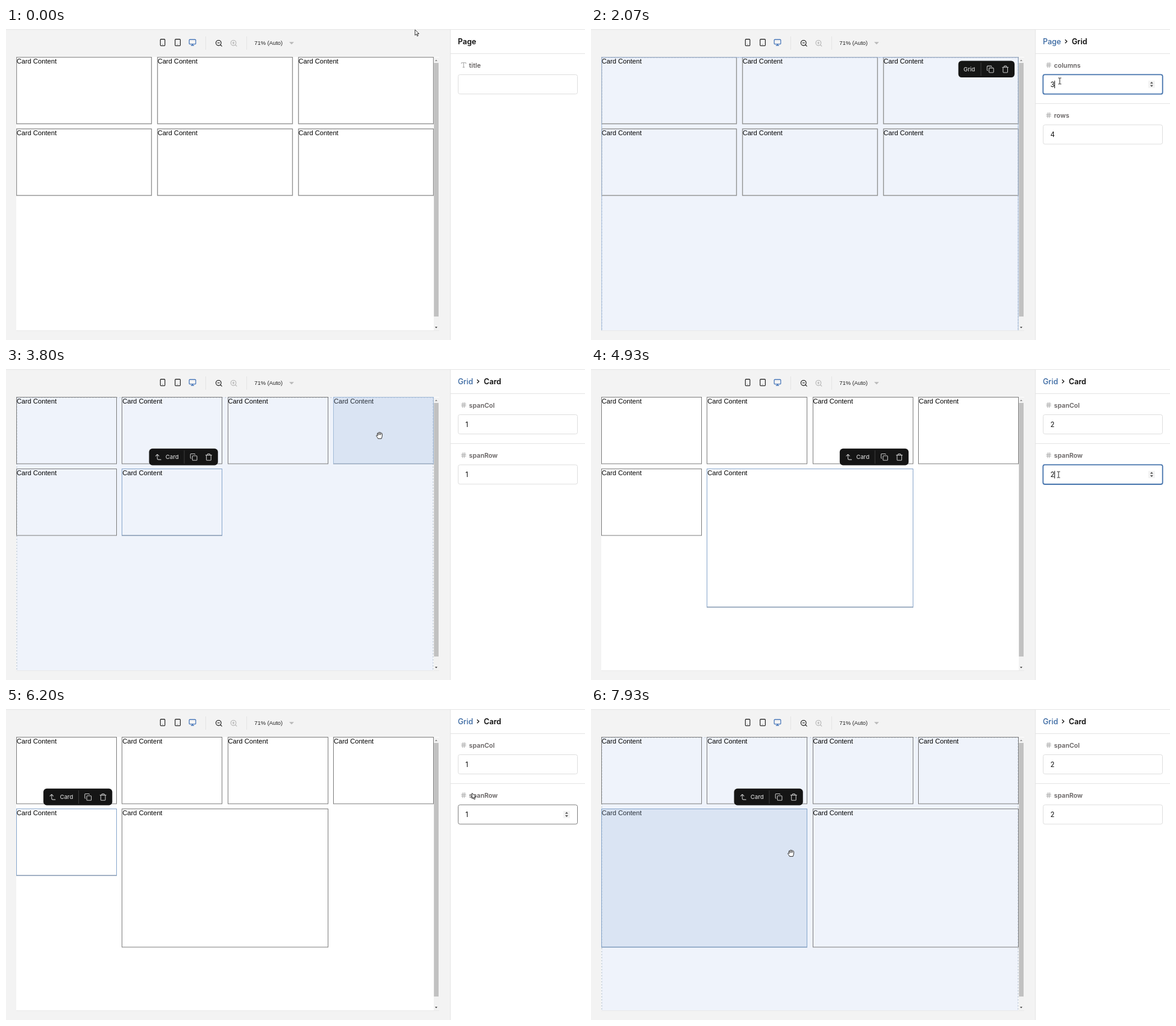
An HTML page for the animation above (8000 ms loop, 961 px wide and 518 px high).

```html
<!DOCTYPE html>
<html lang="en">
<head>
<meta charset="utf-8">
<title>Grid editor</title>
<style>
  html, body { margin: 0; width: 100%; height: 100%; overflow: hidden; background: #fff; }
  svg { display: block; }
  text { white-space: pre; font-family: Inter, sans-serif; }
  .arial { font-family: "Liberation Sans", Arial, sans-serif; }
  .icon { fill: none; stroke-width: 2; stroke-linecap: round; stroke-linejoin: round; }
  .line { stroke: #e4e4e4; }
  .title { font-size: 12.5px; }
  .bold { font-weight: 600; fill: #0a0a0a; }
  .label { font-size: 10.7px; font-weight: 600; fill: #646060; }
  .value { font-size: 11.2px; fill: #111; }
</style>
</head>
<body>
<svg id="stage" width="961" height="518" viewBox="0 0 961 518">
  <defs>
    <symbol id="phone" viewBox="0 0 24 24"><rect x="5" y="2" width="14" height="20" rx="2"/><path d="M12 18h.01"/></symbol>
    <symbol id="tablet" viewBox="0 0 24 24"><rect x="4" y="2" width="16" height="20" rx="2"/><path d="M12 18h.01"/></symbol>
    <symbol id="monitor" viewBox="0 0 24 24"><rect x="2" y="3" width="20" height="14" rx="2"/><path d="M8 21h8M12 17v4"/></symbol>
    <symbol id="zoomOut" viewBox="0 0 24 24"><circle cx="11" cy="11" r="8"/><path d="M21 21l-4.35-4.35M8 11h6"/></symbol>
    <symbol id="zoomIn" viewBox="0 0 24 24"><circle cx="11" cy="11" r="8"/><path d="M21 21l-4.35-4.35M8 11h6M11 8v6"/></symbol>
    <symbol id="copy" viewBox="0 0 24 24"><rect x="8" y="8" width="14" height="14" rx="2"/><path d="M4 16c-1.1 0-2-.9-2-2V4c0-1.1.9-2 2-2h10c1.1 0 2 .9 2 2"/></symbol>
    <symbol id="trash" viewBox="0 0 24 24"><path d="M3 6h18M19 6v14c0 1-1 2-2 2H7c-1 0-2-1-2-2V6M8 6V4c0-1 1-2 2-2h4c1 0 2 1 2 2v2"/></symbol>
    <symbol id="up" viewBox="0 0 24 24"><path d="M14 9L9 4 4 9M20 20h-7a4 4 0 0 1-4-4V4"/></symbol>
    <symbol id="hash" viewBox="0 0 24 24"><path d="M4 9h16M4 15h16M10 3L8 21M16 3l-2 18"/></symbol>
    <symbol id="type" viewBox="0 0 24 24"><path d="M4 7V4h16v3M9 20h6M12 4v16"/></symbol>
  </defs>

  <rect y="2" width="738" height="516" fill="#f3f3f3"/>
  <path class="line" d="M0 2.5H961M737.5 3V518M738 42.5H961"/>

  <g class="icon" stroke="#111">
    <use href="#phone" x="253.5" y="17.5" width="13" height="13"/>
    <use href="#tablet" x="278.5" y="17.5" width="13" height="13"/>
    <use href="#monitor" x="303" y="17.5" width="13" height="13" stroke="#2c63b0"/>
    <use href="#zoomOut" x="346.8" y="18.8" width="13" height="13"/>
    <use href="#zoomIn" x="371.5" y="18.8" width="13" height="13" stroke="#b4b4b4"/>
  </g>
  <path class="line" d="M331.5 14V36M399.5 14V36"/>
  <text class="arial" x="412.3" y="28.3" font-size="9.4" fill="#222">71% (Auto)</text>
  <path d="M470 23.3h8l-4 4z" fill="#b9b9b9"/>

  <rect x="17" y="48" width="702" height="454" fill="#fff"/>
  <path d="M17 502.5H719" stroke="#e9e9e9"/>
  <rect x="710" y="49" width="9" height="453" fill="#f2f2f2"/>
  <rect x="710.3" y="58" width="7.7" height="421" fill="#c1c1c1"/>
  <path d="M712 55h4l-2-2.4z" fill="#8a8a8a"/>
  <path d="M712 496h4l-2 2.4z" fill="#444"/>

  <svg x="17" y="48" width="693" height="454" viewBox="17 48 693 454">
    <g id="tint">
      <rect x="18" y="49" width="691" height="454" fill="#eff3fb"/>
      <rect id="edge" x="17.9" y="49" width="691" height="460" fill="none" stroke="#b9c4d2" stroke-dasharray="3 2"/>
    </g>
    <g id="cards"></g>
    <rect id="gridSel" x="17.7" y="48.8" width="691.4" height="470" fill="none" stroke="#a5bcdc"/>
    <rect id="hover" fill="rgb(155,183,219)" fill-opacity=".25" stroke="#a3bbd8"/>
    <rect id="cardSel" fill="none" stroke="#86a5cb"/>
  </svg>

  <g id="bar">
    <rect id="barBox" height="27.6" rx="5.5" fill="#151515"/>
    <g class="icon" stroke="#c4c4c4">
      <use id="upIcon" href="#up" x="-105.5" y="7.5" width="13" height="13"/>
      <use href="#copy" x="-46.7" y="7.6" width="13" height="13"/>
      <use href="#trash" x="-21.8" y="7.6" width="13" height="13"/>
    </g>
    <path d="M-55.8 3V25" stroke="#3d3d3d"/>
    <text id="barText" y="17.3" font-size="9.6" font-weight="500" fill="#cfcfcf"></text>
  </g>

  <text id="parent" class="title" x="750" y="26.5" font-weight="500" fill="#34649f"></text>
  <path id="chevron" d="M-1.6 -3l3 3-3 3" fill="none" stroke="#222" stroke-width="1.4"/>
  <text id="current" class="title bold" y="26.5"></text>
  <path id="divider" class="line" d="M738 125.5H961"/>
  <g id="fields"></g>

  <g id="cursor">
    <path id="arrow" d="M.4 .4V9.6L2.6 7.6 4.1 11 5.6 10.3 4.1 7H7z" fill="#fff" stroke="#222" stroke-width=".9"/>
    <path id="hand" d="M-2.4 5.4C-3.2 3.4-5.3 1.6-5.2.3-4.8-.8-3.6-.1-3 .7L-3.6-3C-3.5-4.3-2.2-4.3-1.9-3.2L-1.4-4.6C-1-5.6.2-5.4.4-4.4 1.1-5.4 2.3-4.8 2.4-3.6 3.4-4.2 4.6-3.5 4.6-2.3 4.8.8 4.2 3 3.2 5.4z M-1.8-3.2L-1.3-.5M.4-4.4V-.7M2.4-3.6L2.2-.5" fill="#fff" stroke="#222" stroke-width=".95" stroke-linejoin="round"/>
    <path id="beam" d="M-2.5-5H-.8L0-4.5 .8-5H2.5M0-4.5V4.5M-2.5 5H-.8L0 4.5 .8 5H2.5" fill="none" stroke="#222"/>
  </g>
</svg>

<script>
const LOOP = 8000, HOVER_LAG = 60;
const $ = id => document.getElementById(id);
const set = (el, attrs) => { for (const k in attrs) el.setAttribute(k, attrs[k]); };
const show = (el, on) => el.setAttribute('visibility', on ? 'inherit' : 'hidden');
const add = (parent, tag, attrs = {}) => {
  const el = document.createElementNS('http://www.w3.org/2000/svg', tag);
  set(el, attrs);
  return parent.appendChild(el);
};

// time, x, y of the pointer
const path = [
  [0, 678.5, 2.5], [70, 678.5, 2.5], [400, 600, 55], [800, 455, 153], [870, 439, 189.5],
  [1200, 420, 320], [1330, 420, 320], [1780, 735, 145], [1980, 778, 88], [3070, 778, 88],
  [3400, 300, 225], [3600, 285, 225], [3740, 565, 128], [3800, 619, 112], [3920, 722, 98],
  [4080, 776, 93], [4500, 776, 93], [4680, 776, 177], [5000, 776, 177], [5330, 298, 203],
  [5520, 100, 215], [5680, 100, 215], [5980, 715, 180], [6200, 773, 141], [6350, 778, 94],
  [6640, 778, 94], [6800, 776, 177], [7200, 776, 177], [7800, 332, 241], [8000, 332, 241]
];

// selections and edits, merged in order
const events = [
  [0, { sel: null, focus: -1, cols: 3, spans: { 4: [1, 1], 5: [1, 1] } }],
  [1300, { sel: 'grid' }], [2000, { focus: 0 }], [2670, { cols: 4 }],
  [3470, { sel: 5, focus: -1 }], [4130, { focus: 0 }],
  [4400, { spans: { 4: [1, 1], 5: [2, 1] } }], [4760, { focus: 1 }],
  [4900, { spans: { 4: [1, 1], 5: [2, 2] } }],
  [5600, { sel: 4, focus: -1 }], [6400, { focus: 0 }],
  [6560, { spans: { 4: [2, 1], 5: [2, 2] } }], [6850, { focus: 1 }],
  [7050, { spans: { 4: [2, 2], 5: [2, 2] } }], [7860, { focus: -1 }]
];

const slope = (i, axis) => (path[i + 1][axis] - path[i][axis]) / (path[i + 1][0] - path[i][0]);
const tangent = (i, axis) => {
  if (i === 0 || i === path.length - 1) return 0;
  const a = slope(i - 1, axis), b = slope(i, axis);
  return a * b > 0 ? 2 * a * b / (a + b) : 0;
};

// monotone cubic between waypoints
function pointer(t) {
  let i = 0;
  while (i < path.length - 2 && path[i + 1][0] <= t) i++;
  const d = path[i + 1][0] - path[i][0], u = Math.max(0, t - path[i][0]) / d, v = 1 - u;
  return [1, 2].map(k =>
    path[i][k] * (1 + 2 * u) * v * v + path[i + 1][k] * u * u * (3 - 2 * u) +
    d * (tangent(i, k) * u * v * v - tangent(i + 1, k) * u * u * v));
}

function stateAt(t) {
  const s = {};
  for (const [at, patch] of events) if (at <= t) Object.assign(s, patch, { since: at });
  return s;
}

const GAP = 8.5, ROW = 110.5;
function layout({ cols, spans }) {
  const w = (693 - GAP * (cols - 1)) / cols;
  let col = 0, row = 0;
  return [0, 1, 2, 3, 4, 5].map(i => {
    const [sx, sy] = spans[i] || [1, 1];
    if (col + sx > cols) { col = 0; row++; }
    const x = 17 + col * (w + GAP), y = 48 + row * (ROW + GAP);
    col += sx;
    return { x, y, w: sx * w + (sx - 1) * GAP, h: sy * ROW + (sy - 1) * GAP };
  });
}

const inside = ([x, y], b) => x >= b.x && x <= b.x + b.w && y >= b.y && y <= b.y + b.h;
const view = { x: 17, y: 48, w: 693, h: 454 };
const snap = b => {
  const x = Math.round(b.x) + .5, y = Math.round(b.y) + .5;
  return { x, y, width: Math.round(b.x + b.w) - .5 - x, height: Math.round(b.y + b.h) - y };
};

const cards = [0, 1, 2, 3, 4, 5].map(() => {
  const box = add($('cards'), 'rect', { fill: 'none' });
  const text = add($('cards'), 'text', { class: 'arial', 'font-size': 11.15, fill: '#000' });
  text.textContent = 'Card Content';
  return { box, text };
});

const fields = [0, 83.3].map(dy => {
  const g = add($('fields'), 'g', { transform: `translate(0 ${dy})` });
  const icon = add(g, 'use', { class: 'icon', stroke: '#a2a2a2', x: 754, y: 55.8, width: 11.2, height: 11.2 });
  const label = add(g, 'text', { class: 'label', x: 768.6, y: 65.5 });
  const box = add(g, 'rect', { fill: '#fff' });
  const value = add(g, 'text', { class: 'value', x: 762.6, y: 97.5 });
  const caret = add(g, 'path', { d: 'M769.6 87.5V100', stroke: '#111' });
  const spin = add(g, 'g');
  add(spin, 'rect', { x: 925, y: 87.5, width: 11, height: 12, fill: '#f3f3f3' });
  add(spin, 'path', { d: 'M928 92.2h5l-2.5-3zM928 94.8h5l-2.5 3z', fill: '#555' });
  return { g, icon, label, box, value, caret, spin, dy };
});

function drawPanel(s, p, t) {
  const page = s.sel === null, grid = s.sel === 'grid';
  const start = page ? 750 : grid ? 798 : 793;
  $('parent').textContent = page ? '' : grid ? 'Page' : 'Grid';
  $('current').textContent = page ? 'Page' : grid ? 'Grid' : 'Card';
  set($('current'), { x: start });
  show($('chevron'), !page);
  set($('chevron'), { transform: `translate(${start - 9.5} 22.2)` });
  show($('divider'), !page);

  const labels = page ? ['title'] : grid ? ['columns', 'rows'] : ['spanCol', 'spanRow'];
  const values = page ? [''] : grid ? [s.cols, 4] : s.spans[s.sel];
  fields.forEach((f, i) => {
    const used = i < labels.length, focused = used && s.focus === i;
    const over = used && inside(p, { x: 750, y: 55 + f.dy, w: 199, h: 55 });
    show(f.g, used);
    if (!used) { show(f.caret, false); show(f.spin, false); return; }
    set(f.icon, { href: page ? '#type' : '#hash' });
    f.label.textContent = labels[i];
    f.value.textContent = values[i];
    const o = focused ? .2 : 0;
    set(f.box, {
      x: 750.5 - o, y: 77.5 - o, width: 198 + 2 * o, height: 32 + 2 * o, rx: 3,
      stroke: focused ? '#4674ad' : over ? '#808080' : '#dedede', 'stroke-width': focused ? 1.8 : 1
    });
    show(f.caret, focused && (t - s.since) % 1060 < 530);
    show(f.spin, !page && (focused || over));
  });
}

function drawBar(s, boxes) {
  show($('bar'), s.sel !== null);
  if (s.sel === null) return;
  const grid = s.sel === 'grid', b = boxes[s.sel], w = grid ? 93.3 : 114.3;
  const x = grid ? 703 : b.x + b.w - 7.5, y = grid ? 54.4 : b.y - 33.2;
  set($('bar'), { transform: `translate(${x} ${y})` });
  set($('barBox'), { x: -w, width: w });
  show($('upIcon'), !grid);
  $('barText').textContent = grid ? 'Grid' : 'Card';
  set($('barText'), { x: grid ? -84.8 : -87 });
}

function drawCanvas(s, p, t, boxes) {
  const within = inside(p, view);
  show($('tint'), within || s.sel === 'grid');
  show($('gridSel'), s.sel === 'grid');
  cards.forEach((c, i) => {
    const b = boxes[i], wide = s.cols === 3;
    set(c.box, { ...snap(b), stroke: wide ? '#8f8f8f' : '#7c7c7c', 'stroke-width': wide ? 1.35 : 1 });
    set(c.text, { x: b.x + .8, y: b.y + 11.4 });
  });
  const late = pointer(Math.max(0, t - HOVER_LAG));
  const hot = within ? boxes.find(b => inside(late, b)) : null;
  show($('hover'), !!hot);
  if (hot) set($('hover'), snap(hot));
  const chosen = boxes[s.sel];
  show($('cardSel'), !!chosen);
  if (chosen) set($('cardSel'), snap(chosen));
}

function drawCursor(p) {
  const field = fields.some(f => inside(p, { x: 750, y: 77 + f.dy, w: 199, h: 33 }));
  const kind = inside(p, view) ? 'hand' : field ? 'beam' : 'arrow';
  for (const k of ['arrow', 'hand', 'beam']) show($(k), k === kind);
  set($('cursor'), { transform: `translate(${p[0]} ${p[1]})` });
}

function draw() {
  const t = performance.now() % LOOP, s = stateAt(t), p = pointer(t), boxes = layout(s);
  drawCanvas(s, p, t, boxes);
  drawBar(s, boxes);
  drawPanel(s, p, t);
  drawCursor(p);
  requestAnimationFrame(draw);
}
draw();
</script>
</body>
</html>
```
